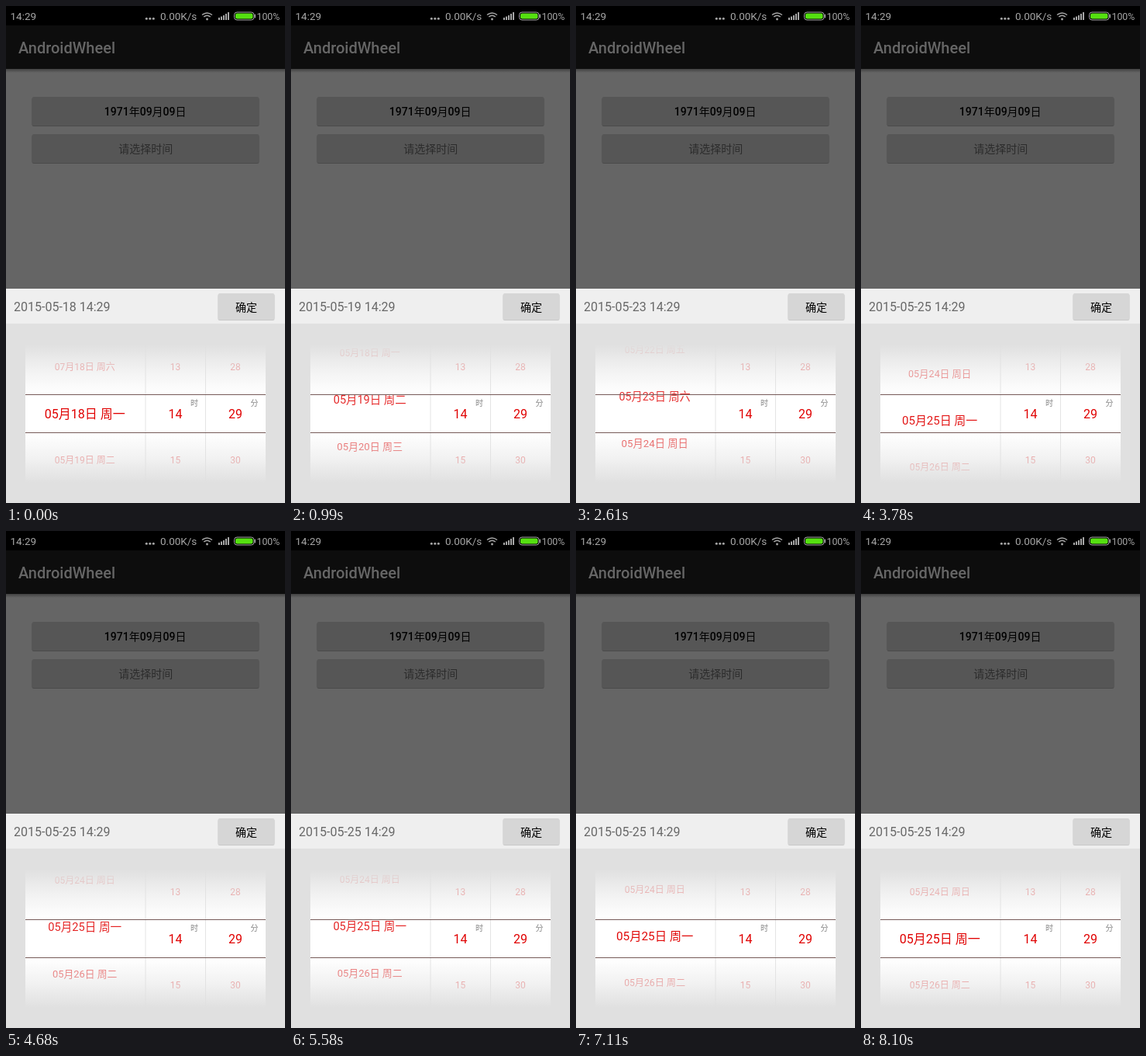
Animation of 360 by 640 pixels, one loop 8190 ms. Source, as an HTML page:

```html
<!DOCTYPE html>
<html lang="zh-CN">
<head>
<meta charset="utf-8">
<title>AndroidWheel</title>
<style>
  html, body { margin: 0; width: 100%; height: 100%; overflow: hidden; background: #666; }
  svg { display: block; width: 100vw; height: 100vh; font-family: Roboto, "Noto Sans CJK SC", sans-serif; }
  .mid { text-anchor: middle; }
  .medium { font-weight: 500; }
  .wheel { fill: #e00000; text-anchor: middle; }
</style>
</head>
<body>
<svg viewBox="0 0 360 640">
  <defs>
    <linearGradient id="fade" x1="0" y1="0" x2="0" y2="1">
      <stop offset="0" stop-color="#e0e0e0"/>
      <stop offset=".5" stop-color="#e0e0e0" stop-opacity=".43"/>
      <stop offset="1" stop-color="#e0e0e0" stop-opacity="0"/>
    </linearGradient>
    <linearGradient id="shadow" x1="0" y1="0" x2="0" y2="1">
      <stop offset="0" stop-opacity=".35"/>
      <stop offset="1" stop-opacity="0"/>
    </linearGradient>
    <clipPath id="view"><rect x="25" y="436" width="310" height="178"/></clipPath>
  </defs>

  <!-- dimmed activity -->
  <rect width="360" height="640" fill="#656565"/>
  <rect y="25" width="360" height="56" fill="#0d0d0d"/>
  <rect y="81" width="360" height="5" fill="url(#shadow)"/>
  <text class="medium" x="16" y="61" font-size="20" fill="#666">AndroidWheel</text>
  <g fill="#4b4b4b">
    <rect x="33.5" y="118" width="293" height="37" rx="2.5"/>
    <rect x="33.5" y="166" width="293" height="37" rx="2.5"/>
  </g>
  <g fill="#565656">
    <rect x="33.5" y="117" width="293" height="37" rx="2.5"/>
    <rect x="33.5" y="165" width="293" height="37" rx="2.5"/>
  </g>
  <text class="mid medium" x="179.7" y="140.5" font-size="14">1971年09月09日</text>
  <text class="mid" x="180.3" y="188.5" font-size="14" fill="#2c2c2c">请选择时间</text>

  <!-- status bar -->
  <rect width="360" height="25"/>
  <g fill="#a6a6a6">
    <text x="5.5" y="18" font-size="13.5">14:29</text>
    <circle cx="181.3" cy="16.3" r="1.5"/><circle cx="185.8" cy="16.3" r="1.5"/><circle cx="190.3" cy="16.3" r="1.5"/>
    <text x="199" y="18" font-size="13.5">0.00K/s</text>
    <text x="323.5" y="17.5" font-size="12.3">100%</text>
    <circle cx="259.5" cy="17" r="1.4"/>
    <path d="M274 15h2v3h-2zM277 13.5h2v4.500h-2zM280 12h2v6h-2zM283 10h2v8h-2zM286 8h2v10h-2z"/>
    <rect x="320.500" y="10.500" width="1.500" height="5" rx=".7"/>
  </g>
  <path d="M253 11.500q6.500-5 13 0M255.200 14q4.300-3.400 8.600 0" fill="none" stroke="#a6a6a6" stroke-width="1.500"/>
  <rect x="294.500" y="8" width="25.500" height="10" rx="3.500" fill="none" stroke="#a6a6a6"/>
  <rect x="296" y="9.500" width="22.500" height="7" rx="2.300" fill="#55e010"/>

  <!-- picker sheet -->
  <rect y="364" width="360" height="276" fill="#e0e0e0"/>
  <rect y="364" width="360" height="45" fill="#efefef"/>
  <text id="title" x="10" y="392.500" font-size="16" fill="#686868"></text>
  <rect x="273.500" y="371" width="73" height="34" rx="2.500" fill="#cacaca"/>
  <rect x="273.500" y="370" width="73" height="34" rx="2.500" fill="#d6d6d6"/>
  <text class="mid medium" x="310" y="392.500" font-size="14">确定</text>

  <rect x="25" y="436" width="310" height="178" fill="#fff"/>
  <path d="M180 436v178M257.500 436v178" stroke="#e4e4e4"/>
  <g id="items" clip-path="url(#view)"></g>
  <rect x="25" y="436" width="310" height="64" fill="url(#fade)"/>
  <rect x="25" y="436" width="310" height="64" fill="url(#fade)" transform="matrix(1 0 0 -1 0 1050)"/>
  <path d="M25 500.500h310M25 549.500h310" stroke="#765a58"/>
  <g class="mid" font-size="10" fill="#858585">
    <text x="243" y="514.500">时</text>
    <text x="320.500" y="514.500">分</text>
  </g>
</svg>
<script>
  const LOOP = 8190, STEP = 90, ROW = 60, CENTER = 525, DAYS = 62;
  const items = document.getElementById('items');
  const title = document.getElementById('title');
  const pad = n => String(n).padStart(2, '0');

  // fling: seconds, scrolled pixels
  const fling = [[.54, 0], [.63, 6], [1.08, 95], [1.62, 191], [2.61, 322],
    [3.78, 411], [4.14, 425], [4.68, 435], [5.22, 439]];

  function addItem(x) {
    const el = document.createElementNS('http://www.w3.org/2000/svg', 'text');
    el.setAttribute('class', 'wheel');
    el.setAttribute('x', x);
    return items.appendChild(el);
  }

  function place(el, label, offset) {
    const d = Math.min(Math.abs(offset), ROW);
    const size = d ? 15.5 - .0583 * d : 16;
    el.textContent = label;
    el.setAttribute('font-size', size);
    el.setAttribute('y', CENTER + offset + .355 * size);
    el.setAttribute('opacity', 1 - .55 * d / ROW);
  }

  function slope(i) {
    if (i === 0 || i === fling.length - 1) return 0;
    const a = fling[i - 1], b = fling[i + 1];
    return (b[1] - a[1]) / (b[0] - a[0]);
  }

  function scrollAt(t) {
    if (t <= fling[0][0]) return 0;
    if (t >= 8.1) return 7 * ROW;
    if (t >= 5.4) return 7 * ROW + 2.3 * (8.1 - t) ** 2 + 1.04;
    const end = fling.findIndex(p => p[0] > t);
    if (end < 0) return fling[fling.length - 1][1];
    const [t0, y0] = fling[end - 1], [t1, y1] = fling[end];
    const h = t1 - t0, s = (t - t0) / h, r = 1 - s;
    return y0 * r * r * (1 + 2 * s) + y1 * s * s * (3 - 2 * s)
      + h * s * r * (r * slope(end - 1) - s * slope(end));
  }

  const dayAt = k => new Date(2015, 4, 18 + (k + DAYS) % DAYS);
  const monthDay = (d, sep, tail) => pad(d.getMonth() + 1) + sep + pad(d.getDate()) + tail;

  for (const [x, value] of [[218.5, 14], [296, 29]])
    for (const k of [-1, 0, 1]) place(addItem(x), value + k, k * ROW);
  const dates = [-1, 0, 1].map(() => addItem(101.7));

  function draw(now) {
    const t = Math.floor(now % LOOP / STEP) * STEP / 1000;
    const y = Math.round(scrollAt(t));
    const base = Math.round(y / ROW);
    dates.forEach((el, i) => {
      const k = base + i - 1, d = dayAt(k);
      place(el, monthDay(d, '月', '日 周') + '日一二三四五六'[d.getDay()], k * ROW - y);
    });
    title.textContent = monthDay(dayAt(base), '-', ' 14:29').replace(/^/, '2015-');
  }

  const start = performance.now();
  function tick() {
    draw(performance.now() - start);
    requestAnimationFrame(tick);
  }
  tick();
</script>
</body>
</html>
```
